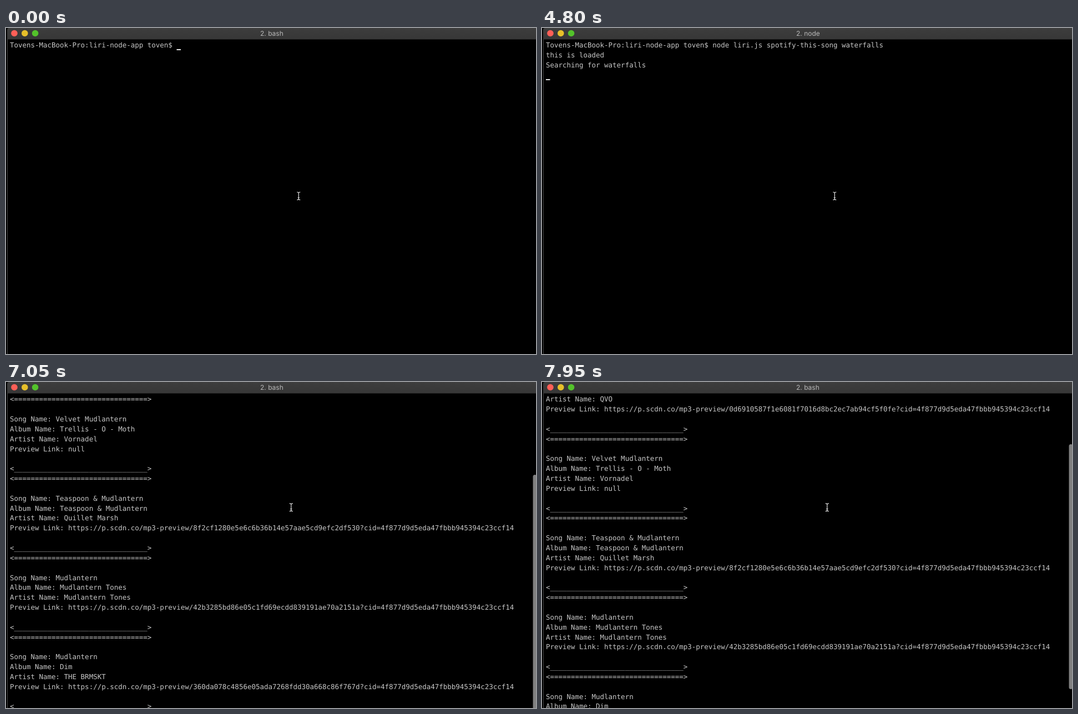
An HTML page with a canvas for the animation above (8 s loop, 955 px wide and 587 px high).

```html
<!DOCTYPE html>
<html lang="en">
<head>
<meta charset="utf-8">
<title>Terminal</title>
<style>
  html, body { margin: 0; width: 100%; height: 100%; overflow: hidden; background: #000; }
  canvas { display: block; }
</style>
</head>
<body>
<canvas id="stage" width="955" height="587"></canvas>
<script>
const ctx = document.getElementById('stage').getContext('2d');
const LOOP = 8000, CHAR = 7.512, ROW = 17.84, LEFT = 7;
const MONO = '12.48px "DejaVu Sans Mono", "Noto Sans Mono", monospace';
const SANS = '12px Inter, "Liberation Sans", sans-serif';

const PROMPT = 'Tovens-MacBook-Pro:liri-node-app toven$ ';
const COMMAND = 'node liri.js spotify-this-song waterfalls';
const preview = hash =>
  `https://p.scdn.co/mp3-preview/${hash}?cid=4f877d9d5eda47fbbb945394c23ccf14`;

const record = ([song, album, artist, link]) => [
  `<${'='.repeat(32)}>`, '',
  `Song Name: ${song}`,
  `Album Name: ${album}`,
  `Artist Name: ${artist}`,
  `Preview Link: ${link}`, '',
  `<${'_'.repeat(32)}>`
];
const results = [
  ['Mudlantern', 'Lumber Quorum', 'QVO', preview('0d6910587f1e6081f7016d8bc2ec7ab94cf5f0fe')],
  ['Velvet Mudlantern', 'Trellis - O - Moth', 'Vornadel', 'null'],
  ['Teaspoon & Mudlantern', 'Teaspoon & Mudlantern', 'Quillet Marsh', preview('8f2cf1280e5e6c6b36b14e57aae5cd9efc2df530')],
  ['Mudlantern', 'Mudlantern Tones', 'Mudlantern Tones', preview('42b3285bd86e05c1fd69ecdd839191ae70a2151a')],
  ['Mudlantern', 'Dim', 'THE BRMSKT', preview('360da078c4856e05ada7268fdd30a668c86f767d')]
].flatMap(record);

// Each track lists [start time, value...]; values hold until the next entry.
const pointer = [[0, 527.3, 302.5], [6000, 523.5, 286.5], [6150, 513.8, 225.7]];
const firstRow = [[0, 8], [7200, 7], [7500, 6], [7800, 4]];
const thumbTop = [[7050, 167], [7350, 156], [7500, 147], [7650, 132], [7800, 120], [7950, 112]];
const at = (track, t) => track.filter(entry => entry[0] <= t).pop()?.slice(1);

function text(string, x, y, font, color) {
  ctx.font = font;
  ctx.textRendering = 'geometricPrecision';
  ctx.fillStyle = color;
  ctx.fillText(string, x, y);
}

function rect(x, y, w, h, color) {
  ctx.fillStyle = color;
  ctx.fillRect(x, y, w, h);
}

function rounded(x, y, w, h, r, color) {
  ctx.fillStyle = color;
  ctx.beginPath();
  ctx.roundRect(x, y, w, h, r);
  ctx.fill();
}

function drawLines(lines) {
  lines.forEach((line, i) => text(line, LEFT, Math.round(35.4 + i * ROW), MONO, '#c7c7c7'));
}

function drawCaret(column, row) {
  rect(LEFT + column * CHAR, Math.round(38 + row * ROW), 7.5, 2, '#e6e6e6');
}

function drawTerminal(t) {
  if (t >= 5250) {
    const [first] = at(firstRow, t);
    drawLines(results.slice(first, first + 33));
    return;
  }
  const lines = [PROMPT + (t >= 750 ? COMMAND : '')];
  if (t >= 4350) lines.push('this is loaded');
  if (t >= 4500) lines.push('Searching for waterfalls');
  drawLines(lines);
  if (t < 4350) drawCaret(lines[0].length, 0);
  else drawCaret(0, lines.length);
}

function drawWindow(t) {
  rect(0, 0, 2, 587, '#000');
  rect(2, 20, 1, 567, '#474747');
  const bar = ctx.createLinearGradient(0, 0, 0, 20);
  bar.addColorStop(0, '#3d3d3d');
  bar.addColorStop(1, '#373737');
  rounded(2, 0, 960, 20, [4, 0, 0, 0], bar);
  rect(3, 20, 952, 1, '#1c1c1c');
  ['#ff5f57', '#e6bf2a', '#53c22b'].forEach((color, i) =>
    rounded(9.2 + i * 18.8, 3.7, 11.6, 11.6, 5.8, color));
  const name = t >= 4800 && t < 5550 ? 'node' : 'bash';
  text(`2. ${name}`, 458, 14, SANS, '#b8b8b8');
}

function drawPointer([x, y]) {
  ctx.save();
  ctx.translate(x, y);
  ctx.strokeStyle = '#e2e2e2';
  ctx.lineWidth = 1.2;
  ctx.beginPath();
  for (const side of [-1, 1]) {
    ctx.moveTo(side * 3, -7);
    ctx.quadraticCurveTo(0, -7, 0, -5);
    ctx.lineTo(0, 5);
    ctx.quadraticCurveTo(0, 7, side * 3, 7);
  }
  ctx.moveTo(-1.6, 3);
  ctx.lineTo(1.6, 3);
  ctx.stroke();
  ctx.restore();
}

function draw(now) {
  const t = now % LOOP;
  rect(0, 0, 955, 587, '#000');
  drawTerminal(t);
  drawWindow(t);
  const thumb = at(thumbTop, t);
  if (thumb) rounded(949.5, thumb[0], 7, 441, 3.5, '#808080');
  drawPointer(at(pointer, t));
}

const start = performance.now();
(function frame() {
  draw(performance.now() - start);
  requestAnimationFrame(frame);
})();
</script>
</body>
</html>
```
